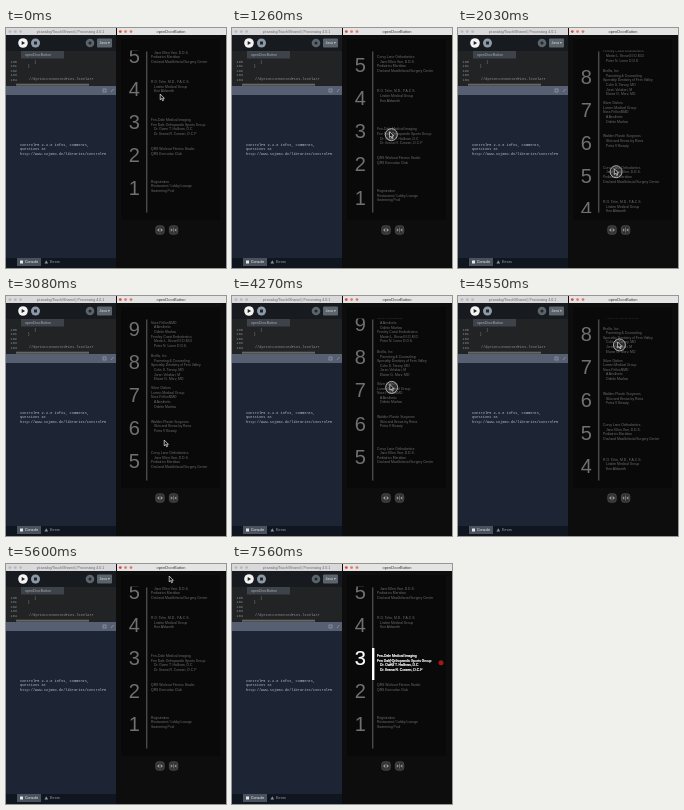
An HTML page for the animation above (8 s loop, 220x240 px).

```html
<!DOCTYPE html>
<html lang="en">
<head>
<meta charset="utf-8">
<style>
html, body { margin: 0; width: 100%; height: 100%; overflow: hidden; background: #000; }
svg { display: block; width: 220px; height: 240px; }
text { font-family: "Liberation Sans", Arial, sans-serif; white-space: pre; }
.mono { font: 3.6px "Liberation Mono", monospace; }
.ui { font-size: 3.6px; }
.line { font-size: 3.4px; }
.num { font-size: 20px; text-anchor: middle; }
</style>
</head>
<body>
<svg viewBox="0 0 220 240">
  <defs><clipPath id="view"><rect x="117" y="22.5" width="96" height="162.5"/></clipPath></defs>

  <g id="editor">
    <rect width="110" height="240" fill="#1d2433"/>
    <rect width="110" height="7" fill="#d9d9db"/>
    <g fill="#b9b9bb"><circle cx="4" cy="3.6" r="1.4"/><circle cx="9.3" cy="3.6" r="1.4"/><circle cx="14.6" cy="3.6" r="1.4"/></g>
    <text class="ui" x="64.5" y="5" text-anchor="middle" fill="#666">pt:analog/Touch/Shared | Processing 4.0.1</text>
    <rect y="7" width="110" height="51" fill="#222324"/>
    <rect y="7" width="110" height="16" fill="#171b20"/>
    <circle cx="17" cy="15" r="4.8" fill="#f4f4f4"/>
    <path d="M15.7 13l3.4 2-3.4 2z" fill="#222"/>
    <circle cx="29.5" cy="15" r="4.5" fill="#8d99a6"/>
    <rect x="28" y="13.5" width="3" height="3" fill="#20262c"/>
    <circle cx="84" cy="15" r="4.3" fill="#5b636b"/>
    <circle cx="84" cy="15" r="1.5" fill="#20262c"/>
    <rect x="91" y="10.5" width="15" height="9" rx="1" fill="#5b636b"/>
    <text class="ui" x="93.5" y="16.3" fill="#ddd">Java ▾</text>
    <rect x="15" y="23" width="43" height="7.5" fill="#3d4349"/>
    <text class="ui" x="19" y="28" fill="#a9afb5">openDoorButton</text>
    <g fill="#8f9499">
      <text class="mono" x="4.5" y="34.8">160        }</text>
      <text class="mono" x="4.5" y="39.3">161     }</text>
      <text class="mono" x="4.5" y="43.8">162</text>
      <text class="mono" x="4.5" y="48.3">163</text>
      <text class="mono" x="4.5" y="52.8">164</text>
      <text class="mono" x="23" y="52.2">//dprintconnectedPins.levelArr</text>
    </g>
    <rect x="10" y="55.7" width="73" height="2" fill="#666"/>
    <rect y="58" width="110" height="9" fill="#575f72"/>
    <g fill="none" stroke="#a4aab6" stroke-width=".6"><rect x="97" y="61" width="3" height="3"/><path d="M105 64l2.5-3"/></g>
    <g fill="#b9bfc8">
      <text class="mono" x="14" y="117.6">ControlP5 2.2.6 infos, comments,</text>
      <text class="mono" x="14" y="122.4">questions at</text>
      <text class="mono" x="14" y="127.1">http://www.sojamo.de/libraries/controlP5</text>
    </g>
    <rect y="230" width="110" height="10" fill="#10161f"/>
    <rect x="11" y="230" width="24" height="8" fill="#4a525e"/>
    <rect x="14" y="232.5" width="3" height="3" fill="#e4e6e8"/>
    <text class="ui" x="19" y="235.4" fill="#fff">Console</text>
    <path d="M38.5 235.5l1.8-3.2 1.8 3.2z" fill="#8b929c"/>
    <text class="ui" x="44" y="235.4" fill="#a4aab2">Errors</text>
  </g>

  <g id="panel">
    <rect x="110" width="110" height="240" fill="#0d0d0d"/>
    <rect x="111" width="109" height="7" fill="#e4e4e5"/>
    <g fill="#e07a66"><circle cx="114.3" cy="3.6" r="1.4" fill="#e0483e"/><circle cx="119.6" cy="3.6" r="1.4"/><circle cx="125" cy="3.6" r="1.4"/></g>
    <text x="165" y="5" font-size="4" text-anchor="middle" fill="#333">openDoorButton</text>
    <rect x="115" y="11" width="99" height="181" fill="#090909"/>
    <g clip-path="url(#view)"><g id="list"></g></g>
    <rect x="140" y="23.5" width="1.4" height="161" fill="#4a4a4a"/>
    <rect id="mark" x="140" y="84" width="2.4" height="32" fill="#fff"/>
    <g fill="#303030" stroke="#5a5a5a" stroke-width=".7">
      <rect x="149.8" y="197.8" width="8.4" height="8.4" rx="2.4"/><rect x="163.4" y="197.8" width="8.4" height="8.4" rx="2.4"/>
    </g>
    <path d="M153 200.3v3.4l-2-1.7zM155 200.3v3.4l2-1.7zM164.8 200.3v3.4l2-1.7zM170.4 200.3v3.4l-2-1.7z" fill="#999"/>
    <path d="M154 199.5v5M167.6 199.5v5" stroke="#999" stroke-width=".6"/>
    <circle id="lamp" cx="209" cy="98.7" r="2.5" fill="#a01a14"/>
    <g id="pointer">
      <circle id="ring" r="6" fill="#bbb" fill-opacity=".2" stroke="#bbb" stroke-width=".9"/>
      <path d="M-1.8-3v5.8l1.4-1.2 1 2.2 1-.5-1-2h1.8z" fill="#111" stroke="#eee" stroke-width=".7"/>
    </g>
  </g>
</svg>
<script>
const $ = id => document.getElementById(id);
const LOOP = 8000, STEP = 70, TRAVEL = 137, PITCH = 33.1;

// number, first line, lines (a leading ">" indents)
const floors = [
  [9, -110.5, "Nora PellonNMD|>A Aesthetic|>Odette Marlow|Fernley Coast Endodontics|>Martin L. Brovell II D.M.D|>Peter N. Lorne D.D.S."],
  [8, -77, "Brellis, Inc|>Parenting & Counseling|Specialty Dentistry of Fern Valley|>Colin S. Tarvey, MD|>Joren Velakari, M|>Elaine G. Morv, MD"],
  [7, -45, "Silver Dishes|Lumen Medical Group|Nora PellonNMD|>A Aesthetic|>Odette Marlow"],
  [6, -11.7, "Walden Plastic Surgeons|>Skin and Brows by Rena|>Petra V Beauty"],
  [5, 19.7, "Corvy Lane Orthodontics|>Jane Ellen Varr, D.D.S.|Pediatrics Meridian|Oral and Maxillofacial Surgery Center"],
  [4, 54, "R.O. Telm, M.D., F.A.C.S.|>Linden Medical Group|>Ken Aldworth"],
  [3, 92, "Fen-Dale Medical Imaging|Fen Dale Orthopaedic Sports Group|>Dr. Owen T. Hallivan, D.C|>Dr. Ileana R. Corwen, D.C.P"],
  [2, 121, "QRS Workout Fitness Studio|QRS Executive Club"],
  [1, 153.5, "Registration|Restaurant / Lobby Lounge|Swimming Pool"]
];

function add(parent, name, attrs, text = "") {
  const el = document.createElementNS("http://www.w3.org/2000/svg", name);
  for (const k in attrs) el.setAttribute(k, attrs[k]);
  el.textContent = text;
  return parent.appendChild(el);
}

let chosen;
for (const [n, top, names] of floors) {
  const g = add($("list"), "g", { fill: "#707070", stroke: "#fff", "stroke-width": 0 });
  add(g, "text", { class: "num", x: 128.2, y: 167.3 - PITCH * (n - 1) }, n);
  names.split("|").forEach((s, i) => add(g, "text", {
    class: "line", x: s[0] === ">" ? 148 : 145, y: top + 1.2 + i * 4.6
  }, s.replace(">", "")));
  if (n === 3) chosen = g;
}

const part = (t, a, b) => Math.min(1, Math.max(0, (t - a) / (b - a)));
const mix = (a, b, p) => a + (b - a) * p;
const out = p => 1 - (1 - p) ** 2;
const inOut = p => p * p * (3 - 2 * p);

// The list gathers speed while the pointer is held, then stops at its end.
const scrollAt = t => TRAVEL * (part(t, 910, 2100) ** 2.2 - part(t, 4060, 5075) ** 2.2);

function pointerAt(t) {
  if (t < 140) return [156 + 4 * part(t, 0, 140), 69 - 9 * part(t, 0, 140)];
  if (t < 2590) return [160 - 2 * part(t, 840, 2100), mix(60, 144, out(part(t, 840, 2100)))];
  if (t < 3990) return [160, 147];
  if (t < 6160) return [mix(158, 165, part(t, 4010, 5110)), mix(146, 15, out(part(t, 4010, 5110)))];
  const p = inOut(part(t, 6160, 7000));
  return [mix(165, 160, p), mix(15, 98, p)];
}

function draw(now) {
  const t = Math.floor((now % LOOP) / STEP + 1e-4) * STEP;
  const [x, y] = pointerAt(t), lit = part(t, 7140, 7560);
  const held = (t >= 910 && t < 2590) || (t >= 3570 && t < 5600);
  const grey = Math.round(mix(112, 255, lit));
  $("list").setAttribute("transform", `translate(0 ${scrollAt(t)})`);
  $("pointer").setAttribute("transform", `translate(${x} ${y})`);
  $("ring").style.display = held ? "" : "none";
  chosen.setAttribute("fill", `rgb(${grey},${grey},${grey})`);
  chosen.setAttribute("stroke-width", 0.2 * lit);
  $("lamp").style.opacity = $("mark").style.opacity = lit;
}

function tick(now) {
  draw(now);
  requestAnimationFrame(tick);
}
draw(0);
requestAnimationFrame(tick);
</script>
</body>
</html>
```
